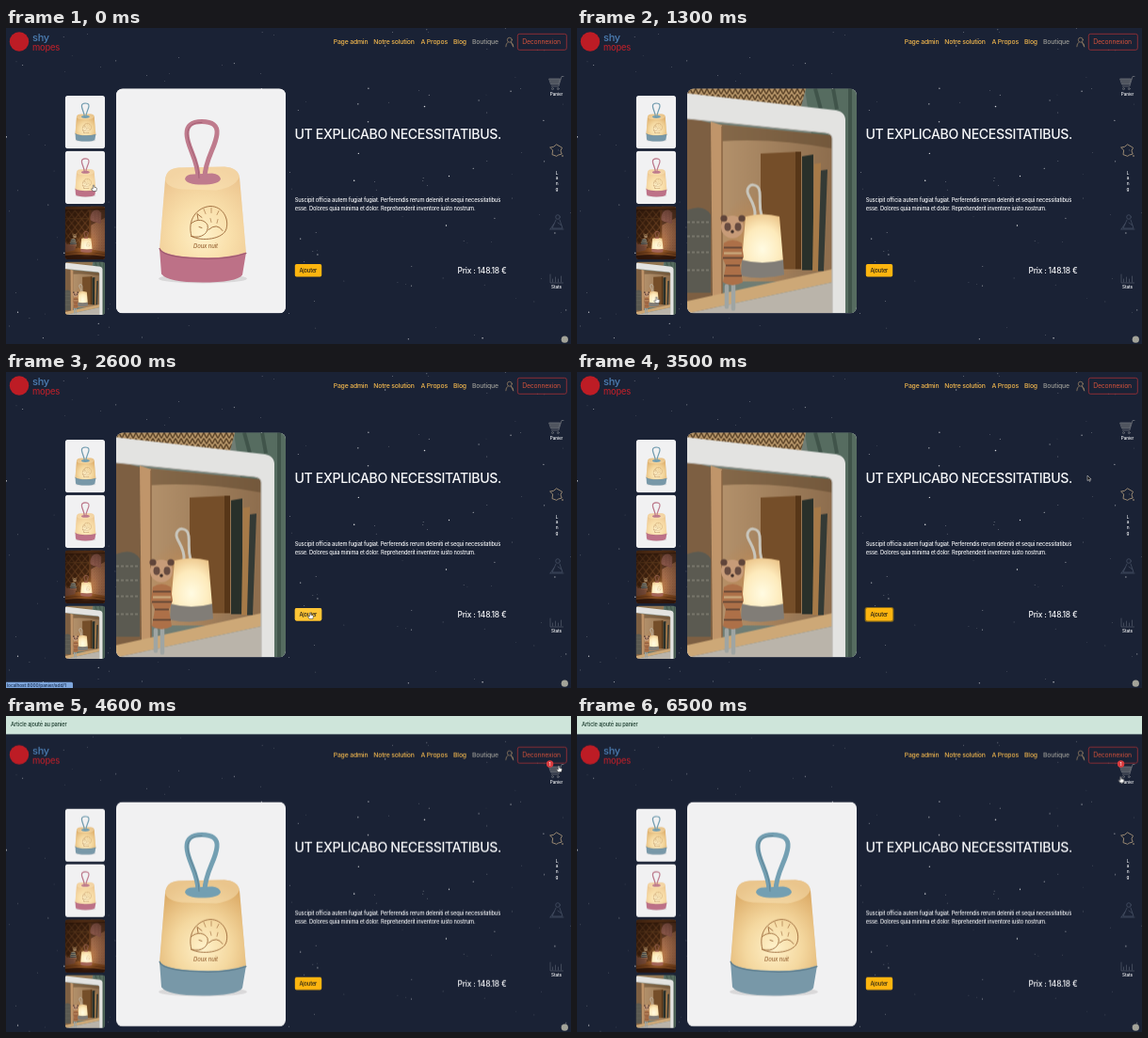
These frames come from a looping animation (600x336 px, 6.6 s). An HTML page:

```html
<!DOCTYPE html>
<html lang="fr">
<head>
<meta charset="utf-8">
<title>Boutique</title>
<style>
html, body { margin: 0; width: 600px; height: 336px; overflow: hidden; background: #1a2235; }
svg { display: block; }
text { font-family: Inter, "Open Sans", sans-serif; font-weight: 500; letter-spacing: -.025em; }
.nav { font-size: 6.85px; fill: #f3b84e; }
.small { font-size: 5.7px; fill: #f7f8fa; }
.tiny { font-size: 4.7px; fill: #f4f5f7; }
.line { fill: none; stroke-linecap: round; stroke-linejoin: round; }
.pink { --strap: #bf7b8d; --base: #bd7187; --dark: #9f5a70; --edge: #ecc48e; }
.blue { --strap: #739fb2; --base: #7898a8; --dark: #5a7b8c; --edge: #dba964; }

/* every part shares one 6.6 s loop */
.step { animation: 6.6s step-end infinite; }
#page { animation-name: drop; }
.added { animation-name: added; }
#show-pink { animation-name: show-pink; }
#show-nook { animation-name: show-nook; }
#show-shelf { animation-name: show-shelf; }
#status { animation-name: status; }
#hover { animation-name: hover; }
#focus { animation-name: focus; }
#hand { animation-name: hand; }
#arrow { animation-name: arrow; }
#cursor { animation: travel 6.6s linear infinite; }

@keyframes drop { 0% { transform: none } 63.62% { transform: translateY(26.7px) } 100% { transform: translateY(26.7px) } }
@keyframes added { 0% { opacity: 0 } 63.62%, 100% { opacity: 1 } }
@keyframes show-pink { 0% { opacity: 1 } 9.08%, 100% { opacity: 0 } }
@keyframes show-nook { 0% { opacity: 0 } 9.08% { opacity: 1 } 18.17%, 100% { opacity: 0 } }
@keyframes show-shelf { 0% { opacity: 0 } 18.17% { opacity: 1 } 63.62%, 100% { opacity: 0 } }
@keyframes status { 0% { opacity: 0 } 33.3% { opacity: 1 } 51.5%, 100% { opacity: 0 } }
@keyframes hover { 0% { opacity: 0 } 31.8% { opacity: 1 } 50%, 100% { opacity: 0 } }
@keyframes focus { 0% { opacity: 0 } 45.4% { opacity: 1 } 63.62%, 100% { opacity: 0 } }
@keyframes hand { 0% { opacity: 1 } 20.5% { opacity: 0 } 31.8% { opacity: 1 } 49.5% { opacity: 0 } 60% { opacity: 1 } 100% { opacity: 1 } }
@keyframes arrow { 0% { opacity: 0 } 20.5% { opacity: 1 } 31.8% { opacity: 0 } 49.5% { opacity: 1 } 60% { opacity: 0 } 100% { opacity: 0 } }
@keyframes travel {
  0%, 1.5% { transform: translate(93px, 167px) }
  6.06% { transform: translate(90px, 200px) }
  9.08%, 13.6% { transform: translate(86px, 228px) }
  16.7%, 19.7% { transform: translate(84px, 286px) }
  25.76%, 28.8% { transform: translate(280.5px, 260.5px) }
  33.3%, 48.5% { transform: translate(323px, 256px) }
  52%, 54.5% { transform: translate(542px, 110px) }
  60.6%, 82% { transform: translate(587px, 53px) }
  91%, 100% { transform: translate(577.5px, 64.5px) }
}
</style>
</head>
<body>
<svg width="600" height="336" viewBox="0 0 600 336">
<defs>
  <radialGradient id="glow" cx=".5" cy=".72" r=".72">
    <stop offset="0" stop-color="#fff2cb"/><stop offset=".45" stop-color="#fde8b4" stop-opacity=".75"/>
    <stop offset="1" stop-color="#fde8b4" stop-opacity="0"/>
  </radialGradient>
  <radialGradient id="warm" cx=".5" cy=".7" r=".75">
    <stop offset="0" stop-color="#fffbe2"/><stop offset=".6" stop-color="#fdeabb"/><stop offset="1" stop-color="#ebc489"/>
  </radialGradient>
  <radialGradient id="halo">
    <stop offset="0" stop-color="#f0a654" stop-opacity=".6"/><stop offset="1" stop-color="#c47a38" stop-opacity="0"/>
  </radialGradient>
  <radialGradient id="dusk" cx=".55" cy=".6" r=".75">
    <stop offset=".25" stop-color="#1c0d06" stop-opacity="0"/><stop offset="1" stop-color="#1c0d06" stop-opacity=".6"/>
  </radialGradient>
  <linearGradient id="oak">
    <stop offset="0" stop-color="#b3916b"/><stop offset="1" stop-color="#8c6c4c"/>
  </linearGradient>
  <pattern id="lattice" width="30" height="38" patternUnits="userSpaceOnUse">
    <rect width="30" height="38" fill="#40230f"/>
    <path d="M0 0L30 38M30 0L0 38" stroke="#6d4221" stroke-width="4"/>
  </pattern>
  <pattern id="floral" width="11" height="13" patternUnits="userSpaceOnUse">
    <rect width="11" height="13" fill="#a8714f"/>
    <g fill="#833b2b"><circle cx="3" cy="3" r="1.4"/><circle cx="8.5" cy="9" r="1.6"/></g>
    <path d="M6 1l1 3M2 8l2 3M9 4l1 2" stroke="#73522f"/>
  </pattern>
  <pattern id="weave" width="6" height="6" patternUnits="userSpaceOnUse">
    <rect width="6" height="6" fill="#b59468"/><path d="M0 6L3 0L6 6" fill="none" stroke="#594126" stroke-width="1.4"/>
  </pattern>

  <symbol id="lamp" viewBox="0 0 180 239">
    <rect width="180" height="239" fill="#f1f1f2"/>
    <ellipse cx="92" cy="202" rx="47" ry="5" fill="#d9d8d9"/>
    <g id="shade">
      <path d="M52 97Q53 85 66 84L115 83Q129 84 131 94L138 176Q110 186 78 183Q48 180 46 172Z" style="fill:var(--edge)"/>
      <path d="M52 97Q53 85 66 84L115 83Q129 84 131 94L138 176Q110 186 78 183Q48 180 46 172Z" fill="url(#glow)"/>
    </g>
    <path d="M52 97Q53 85 66 84L115 83Q129 84 131 94Q126 105 106 108L70 107Q54 105 52 97Z" fill="#fae7bd" opacity=".45"/>
    <path d="M46 169Q49 177 78 179Q115 182 138 174L134 198Q128 206 91 206Q55 206 48 197Z" style="fill:var(--base)"/>
    <path d="M46 170Q49 178 78 180Q115 183 138 175" class="line" style="stroke:var(--dark)" stroke-width="1.2"/>
    <path d="M73 96Q74 91 82 91L102 90Q110 91 111 96Q109 102 91 102Q75 102 73 96Z" style="fill:var(--strap)"/>
    <path d="M87 95C87 75 75 62 75 48C75 38 81 35 91 35C102 35 108 39 107 48C106 62 94 75 94 95" class="line" style="stroke:var(--strap)" stroke-width="5"/>
    <path d="M88 95C88 75 76 62 76 48C76 39 82 36 91 36" class="line" style="stroke:var(--dark)" stroke-width=".8"/>
    <g class="line" stroke="#9a6738" stroke-width=".9">
      <path d="M80 157C75 139 86 126 100 125C113 125 120 138 117 149C114 160 91 163 80 157Z"/>
      <path d="M80 157C91 160 99 153 97 145C94 139 86 138 80 143M87 139L86 133L91 137M88 147l3 1M98 150Q107 142 113 151"/>
      <path d="M93 128l2 5M101 127l0 5M109 130l-2 4M100 138l1 4M108 139l-1 4" stroke-width=".6"/>
    </g>
    <text x="82" y="169" font-size="6" font-style="italic" fill="#9a6738">Doux nuit</text>
  </symbol>

  <symbol id="nook" viewBox="0 0 180 239">
    <rect width="180" height="239" fill="url(#lattice)"/>
    <path d="M116 0H180V215L116 192Z" fill="url(#floral)"/>
    <path d="M116 0H180V52L116 85Z" fill="#3a1e10" opacity=".6"/>
    <path d="M0 0H180V13L0 17Z" fill="#6f401d"/><path d="M0 17L180 13" stroke="#34190b" stroke-width="3"/>
    <path d="M0 56H114" stroke="#67401f" stroke-width="4"/>
    <path d="M108 16H116V192H108Z" fill="#6d401f"/>
    <path d="M122 26Q133 13 150 18L163 30L162 76Q152 82 142 73Q127 72 114 62Q110 44 122 26Z" fill="#9b6254"/>
    <path d="M125 31Q126 50 126 62M142 29Q146 50 143 70M154 34Q158 50 153 74" class="line" stroke="#c99179" stroke-width="1.6" stroke-dasharray="0 7"/>
    <path d="M0 192L75 186L180 204V239H0Z" fill="#8a4f22"/>
    <path d="M0 212Q90 200 180 216" class="line" stroke="#5a2f13" stroke-width="2.5"/>
    <path d="M0 221Q90 211 180 225V239H0Z" fill="#36190c"/>
    <path d="M28 148Q37 142 46 146L53 176H21Z" fill="#b3a484"/>
    <path d="M27 152H48M25 160H50M23 168H52" stroke="#34444e" stroke-width="4.4"/>
    <circle cx="43" cy="133" r="9" fill="#9c7850"/><circle cx="35" cy="125" r="3.5" fill="#7f5b38"/><circle cx="51" cy="125" r="3.5" fill="#7f5b38"/>
    <ellipse cx="45" cy="137" rx="5" ry="4" fill="#cfae85"/><path d="M45 135v1M41 131v.5M48 131v.5" class="line" stroke="#352218" stroke-width="1.6"/>
    <path d="M0 158L10 172L53 172L44 197L5 206L0 198Z" fill="#855541"/><path d="M0 158L10 172L53 172" class="line" stroke="#a87358"/>
    <rect width="180" height="239" fill="url(#dusk)"/>
    <circle cx="96" cy="169" r="62" fill="url(#halo)"/>
    <path d="M91 146C92 133 86 128 86 120C86 111 104 111 104 120C104 128 97 132 97 146" class="line" stroke="#a0665a" stroke-width="3.5"/>
    <path d="M74 144Q96 138 117 144L122 193Q95 198 70 192Z" fill="url(#warm)"/>
    <ellipse cx="94" cy="143" rx="10" ry="2.6" fill="#b0705f"/>
    <path d="M70 191Q95 196 122 192L121 205Q95 210 71 204Z" fill="#a5665a"/>
    <path d="M96 176Q96 161 107 161Q116 166 112 177Q106 183 96 179ZM99 172Q109 167 109 177" class="line" stroke="#b98143" stroke-width=".8"/>
  </symbol>

  <symbol id="shelf" viewBox="0 0 180 239">
    <rect width="180" height="239" fill="#6f7d74"/>
    <path d="M125 0H180V239H160Z" fill="#566c60"/><path d="M136 0L142 22M155 0L159 22M173 0V239" stroke="#40544a" stroke-width="4"/>
    <path d="M0 0H126L121 19L0 10Z" fill="url(#weave)"/>
    <path d="M0 30L30 38V239H0Z" fill="#7d5f42"/>
    <path d="M35 38L156 50V205H35Z" fill="url(#oak)"/>
    <path d="M35 38L156 50V64Q92 52 35 56Z" fill="#5f482f" opacity=".55"/>
    <circle cx="81" cy="160" r="50" fill="url(#halo)"/>
    <path d="M78 69L121 67V192H78Z" fill="#754e29"/><path d="M115 67H121V192H115Z" fill="#573618"/>
    <path d="M122 72L134 70V193H122Z" fill="#29302a"/>
    <path d="M135 80L142 79L139 194H133Z" fill="#a67a48"/>
    <path d="M142 87L149 86L145 194H139Z" fill="#343a35"/>
    <path d="M0 129Q18 122 25 134V217H0Z" fill="#5b5a51"/><path d="M0 142H24M0 157H24M0 174H24M0 193H24" stroke="#77756a" stroke-width="2" stroke-dasharray="3 2"/>
    <path d="M25 35L37 39V221H27Z" fill="#c0956a"/><path d="M37 40V218" stroke="#8a6644" stroke-width="1.5"/>
    <path d="M0 226L154 192V206L0 239Z" fill="#cda877"/><path d="M0 239L154 206V239Z" fill="#bab4aa"/>
    <path d="M42 210V232M49 209V234" class="line" stroke="#9fa5a3" stroke-width="4.5"/>
    <path d="M72 135C73 122 64 115 64 109C64 100 76 100 77 110C78 121 76 124 79 135" class="line" stroke="#c8c5bb" stroke-width="3"/>
    <path d="M62 136Q80 131 98 136L102 184Q80 190 58 184Z" fill="url(#warm)"/>
    <path d="M58 182Q80 188 102 182L103 198Q80 204 57 199Z" fill="#817d77"/>
    <path d="M39 164Q48 158 58 164L60 179L56 188L59 206Q48 212 38 206L41 188L37 179Z" fill="#ad7048"/>
    <path d="M39 169H58M38 180H59M41 188H56M39 199H58" stroke="#6b4b38" stroke-width="1.8"/><path d="M39 175H58" stroke="#c7a579" stroke-width="2.5"/>
    <ellipse cx="48" cy="147" rx="12" ry="12" fill="#c79b78"/><circle cx="39" cy="138" r="3.6" fill="#60453a"/><circle cx="58" cy="138" r="3.6" fill="#60453a"/>
    <ellipse cx="43" cy="147" rx="3.5" ry="4.4" fill="#674b40"/><ellipse cx="54" cy="147" rx="3.5" ry="4.4" fill="#674b40"/><circle cx="48" cy="152" r="1.8" fill="#3c2b26"/>
    <path d="M0 5L158 23Q169 25 168 36V239H154V53Q154 48 147 47L0 32Z" fill="#e3e3e1"/>
    <path d="M0 32L147 47Q154 48 154 53V239" class="line" stroke="#b9b6b0" stroke-width="1.2"/>
  </symbol>

  <clipPath id="card"><rect x="117" y="64.5" width="180" height="239" rx="7"/></clipPath>
  <clipPath id="cards">
    <rect x="62.6" y="71.7" width="42.7" height="56.7" rx="4"/><rect x="62.6" y="130.6" width="42.7" height="56.7" rx="4"/>
    <rect x="62.6" y="189.5" width="42.7" height="56.7" rx="4"/><rect x="62.6" y="248.4" width="42.7" height="56.7" rx="4"/>
  </clipPath>
</defs>

<rect width="600" height="336" fill="#1a2235"/>

<g id="page" class="step">
  <g id="stars" fill="#fff"></g>

  <circle cx="14" cy="14.5" r="10.2" fill="#bd1c25"/>
  <text x="28" y="14" font-size="11" fill="#4d7fb5">shy</text>
  <text x="28" y="23.8" font-size="9.3" fill="#b3202a">mopes</text>

  <g class="nav">
    <text x="347.7" y="17">Page admin</text><text x="390.2" y="17">Notre solution</text>
    <text x="440.5" y="17">A Propos</text><text x="475" y="17">Blog</text>
    <text x="495" y="17" fill="#9b9b96">Boutique</text>
  </g>
  <g class="line" stroke="#a58c6a" stroke-width=".7">
    <circle cx="534.8" cy="12.7" r="2.5"/><path d="M530.8 19.8Q530.8 15.8 533 15.2M536.6 15.2Q538.8 16 538.8 19.8Z"/>
  </g>
  <rect x="543.3" y="6.3" width="52" height="17" rx="2" fill="none" stroke="#a93236" stroke-width=".8"/>
  <text x="548.2" y="17.3" font-size="6.9" style="font-weight:400" fill="#d4523b">Deconnexion</text>

  <g clip-path="url(#cards)">
    <use href="#lamp" class="blue" x="62.6" y="71.7" width="42.7" height="56.7"/>
    <use href="#lamp" class="pink" x="62.6" y="130.6" width="42.7" height="56.7"/>
    <use href="#nook" x="62.6" y="189.5" width="42.7" height="56.7"/>
    <use href="#shelf" x="62.6" y="248.4" width="42.7" height="56.7"/>
  </g>
  <g clip-path="url(#card)">
    <use href="#lamp" class="blue" x="117" y="64.5" width="180" height="239"/>
    <g id="show-pink" class="step"><use href="#lamp" class="pink" x="117" y="64.5" width="180" height="239"/></g>
    <g id="show-nook" class="step"><use href="#nook" x="117" y="64.5" width="180" height="239"/></g>
    <g id="show-shelf" class="step"><use href="#shelf" x="117" y="64.5" width="180" height="239"/></g>
  </g>

  <text x="306.5" y="117.6" font-size="14.1" fill="#f7f8fa" style="font-weight:550">UT EXPLICABO NECESSITATIBUS.</text>
  <g class="small">
    <text x="306.8" y="185">Suscipit officia autem fugiat fugiat. Perferendis rerum deleniti et sequi necessitatibus</text>
    <text x="306.8" y="193.5">esse. Dolores quia minima et dolor. Reprehenderit inventore iusto nostrum.</text>
  </g>
  <rect id="focus" class="step" x="305.6" y="249.9" width="30.8" height="15.8" rx="2.5" fill="#8c6c18"/>
  <rect x="306.8" y="251.1" width="28.4" height="13.4" rx="1.7" fill="#fdb50f"/>
  <rect id="hover" class="step" x="306.8" y="251.1" width="28.4" height="13.4" rx="1.7" fill="#ffc536"/>
  <text x="311.4" y="259.9" font-size="5.7" fill="#1b1a16">Ajouter</text>
  <text x="479.6" y="260.8" font-size="8.4" fill="#f7f8fa">Prix : 148.18 €</text>
</g>

<g class="step added">
  <rect width="600" height="19.4" fill="#cee5da"/>
  <text x="5" y="11.4" font-size="5.7" fill="#17382a">Article ajouté au panier</text>
</g>

<g id="side">
  <g class="line" stroke="#666a73" stroke-width=".9">
    <path d="M592 51.5H590L586.8 62H579.3"/><path d="M577 54H588.6L586.8 60H579Z" fill="#50555f"/>
    <circle cx="580.5" cy="64.6" r="1"/><circle cx="586.3" cy="64.6" r="1"/>
  </g>
  <text class="tiny" x="577.8" y="72">Panier</text>
  <path d="M578 127L581.5 126.3L584.6 123.8L590.5 127.3L589 130.6L590.2 134L586.7 135L584.6 136.3L580 134.6L580.6 130.3Z" class="line" stroke="#b9a382" stroke-width=".8"/>
  <path d="M591 135.5v1" class="line" stroke="#b9a382"/>
  <g class="tiny" text-anchor="middle">
    <text x="585" y="155.5">L</text><text x="585" y="161.3">a</text><text x="585" y="167">n</text><text x="585" y="172.5">g</text>
  </g>
  <g class="line" stroke="#465064" stroke-width=".8">
    <circle cx="586" cy="201" r="2.3"/><path d="M584 204L580 213H591L588 204M582 208L578 214M586 207L590 210M578 214H592"/>
  </g>
  <path d="M578 262V271H591.5M580.5 270V267M583.5 270V265M586.5 270V267M589.5 270V264" class="line" stroke="#535b6a" stroke-width=".7"/>
  <text class="tiny" x="579" y="277">Stats</text>
  <g class="step added">
    <circle cx="577.6" cy="51" r="3.7" fill="#d93b3e"/>
    <text x="577.5" y="52.7" font-size="4.8" text-anchor="middle" fill="#fff">1</text>
  </g>
  <circle cx="593.3" cy="331.2" r="3.6" fill="#a3a399"/>
</g>

<g id="status" class="step">
  <path d="M0 329.8H69.5Q71 329.8 71 331.5V336H0Z" fill="#7ea6dc"/>
  <text x="1" y="334.6" font-size="4.9" fill="#1d3357">localhost:8000/panier/add/1</text>
</g>

<g id="cursor" stroke-linejoin="round">
  <path id="arrow" class="step" d="M0 0V5.6L1.4 4.4L2.3 6.4L3.2 6L2.3 4.1H4.1Z" fill="#111" stroke="#eee" stroke-width=".5"/>
  <path id="hand" class="step" d="M-.7 .3Q0 -.6 .7 .3V2.3L3 2.8Q3.6 3 3.4 4L2.8 6.6H-.7L-2.5 4Q-2.3 3.2 -.7 4.1Z" fill="#fff" stroke="#222" stroke-width=".5"/>
</g>
</svg>

<script>
// Night sky: small dots from a fixed seed
let seed = 41;
const rand = () => (seed = seed * 16807 % 2147483647) / 2147483647;
const stars = document.getElementById("stars");
for (let i = 0; i < 190; i++) {
  const dot = document.createElementNS("http://www.w3.org/2000/svg", "circle");
  const spec = { cx: rand() * 600, cy: rand() * 366 - 28, r: .3 + rand() ** 3 * .5, opacity: .4 + rand() * .5 };
  for (const key in spec) dot.setAttribute(key, spec[key].toFixed(2));
  stars.append(dot);
}
</script>
</body>
</html>
```
